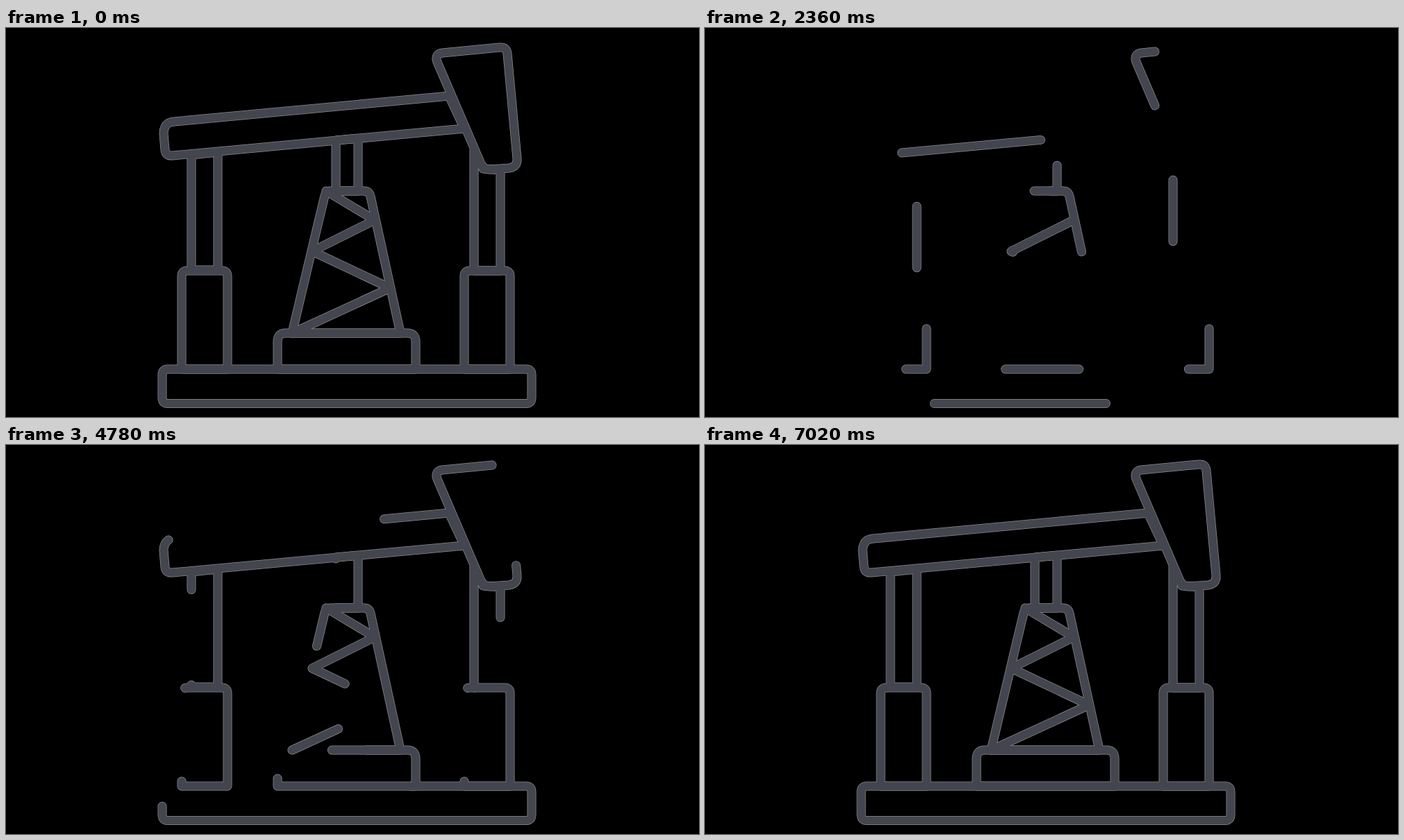
Recreate the animation shown at these times as an HTML page. Size 998 by 561 pixels, loop 7.04 s.

```html
<!DOCTYPE html>
<html lang="en">
<head>
<meta charset="utf-8">
<title>Pump jack line drawing</title>
<style>
  html, body { margin: 0; width: 100%; height: 100%; overflow: hidden; background: #000; }
  svg { display: block; width: 100%; height: 100%; }
  path { fill: none; stroke-linecap: round; stroke-linejoin: round; }
  #rims { stroke: #8c8c8c; stroke-width: 13; }
  #lines { stroke: #43454f; stroke-width: 11.5; }
</style>
</head>
<body>
<svg viewBox="0 0 998 561">
  <g id="rims"></g>
  <g id="lines"></g>
</svg>
<script>
const LOOP = 7040;
const cylinder = x =>
  `M${x} 485V358Q${x} 350 ${x + 8} 350h50q8 0 8 8V492H${x}Z`;

// Each outline is traced from the point where its stroke appears and vanishes.
const outlines = [
  { d: 'M700 29L711 28Q721 27 722 37L736 188Q737 200 725 202L696 204Q688 204 684 196L621 49Q617 38 628 36Z' },
  { d: 'M234 137Q237 135.5 242 135L638 98L660 145L240 184Q230 185 229 176L227 152Q227 142 234 137Z' },
  { d: 'M267 346V183L305 179V349H267Z' },
  { d: 'M475 235V162L507 159V235Z' },
  { d: 'M676 350H712V205L687 203L674 176V350Z' },
  { d: cylinder(253) },
  { d: cylinder(660) },
  { d: 'M447.5 290L412 440H568L525 243Q523 235 515 235H468Q461 235 459 242Z' },
  { d: 'M461 235L531 277L441 322L553 375L412 440', phase: 0.508 },
  { d: 'M391 481V452Q391 440 403 440H578Q590 440 590 452V492H391Z' },
  { d: 'M225 521V500Q225 492 233 492H749Q757 492 757 500V533Q757 541.5 749 541.5H233Q225 541.5 225 533Z' }
];

function addPath(groupId, d) {
  const path = document.createElementNS('http://www.w3.org/2000/svg', 'path');
  path.setAttribute('d', d);
  document.getElementById(groupId).append(path);
  return path;
}

const strokes = outlines.map(({ d, phase = 0 }) => {
  const paths = [addPath('rims', d), addPath('lines', d)];
  return { paths, phase, length: paths[0].getTotalLength() };
});

// Steps are held for 20, 100 and 20 ms in turn.
function stepAt(time) {
  const rest = time % 140;
  return Math.floor(time / 140) * 3 + (rest < 20 ? 0 : rest < 120 ? 1 : 2);
}

// Visible part of every outline: where it begins and how much of it shows.
function trimAt(step) {
  const erasing = step < 63;
  const share = erasing ? (62.3 - step) / 57.3 : (step - 63.4) / 59.4;
  const size = Math.min(1, Math.max(0, share));
  return { size, start: erasing ? 1 - 1.5 * size : size / 2 };
}

function applyTrim({ paths, phase, length }, { size, start }) {
  const offset = ((start + phase + 1) % 1) * length;
  for (const { style } of paths) {
    style.visibility = size > 0 ? 'visible' : 'hidden';
    style.strokeDasharray = size < 1 ? `${size * length} ${(1 - size) * length}` : 'none';
    style.strokeDashoffset = -offset;
  }
}

function render(time) {
  const trim = trimAt(stepAt(time % LOOP));
  strokes.forEach(stroke => applyTrim(stroke, trim));
}

const began = performance.now();
function tick() {
  render(performance.now() - began);
  requestAnimationFrame(tick);
}
tick();
</script>
</body>
</html>
```
